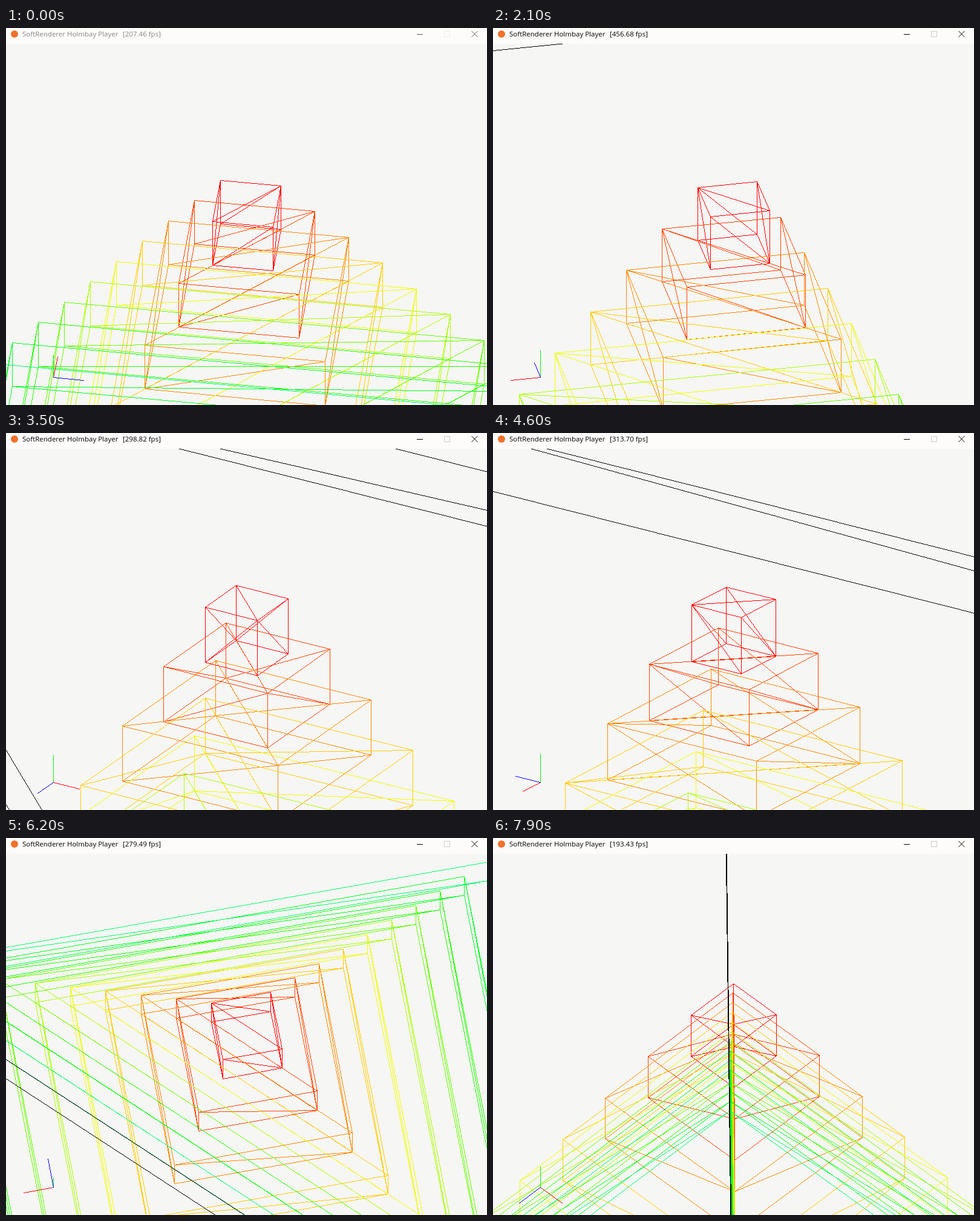
An HTML page with a canvas for the animation above (8 s loop, 795 by 622 pixels).

```html
<!DOCTYPE html>
<html lang="en">
<head>
<meta charset="utf-8">
<title>Wireframe pyramid</title>
<style>
html, body { margin: 0; width: 100%; height: 100%; overflow: hidden; background: #f6f6f5; }
#bar {
  position: absolute; left: 0; top: 0; width: 795px; height: 26px;
  background: #fdfcfa; color: #000;
  font: 11.5px/16px "Open Sans", "Noto Sans", sans-serif; white-space: pre;
}
#bar.idle { color: #868686; }
#bar span { position: absolute; top: 2px; }
#dot { position: absolute; left: 8px; top: 4px; width: 12px; height: 12px; border-radius: 50%; background: #f0722c; }
#name { left: 27px; }
#fps { left: 193px; }
#bar svg { position: absolute; left: 670px; top: 0; fill: none; stroke: currentColor; }
#bar.idle svg { color: #606060; }
#max { stroke: #cccccc; }
.idle #max { stroke: #ececec; }
canvas { position: absolute; left: 0; top: 26px; }
</style>
</head>
<body>
<div id="bar" class="idle">
  <i id="dot"></i><span id="name">SoftRenderer Holmbay Player</span><span id="fps"></span>
  <svg width="125" height="26">
    <path d="M9 10.5h10" shape-rendering="crispEdges"/>
    <path id="max" d="M54.5 5.5h9v9h-9z" shape-rendering="crispEdges"/>
    <path d="M99.5 5l10 10M109.5 5l-10 10"/>
  </svg>
</div>
<canvas id="view" width="795" height="596"></canvas>
<script>
const W = 795, H = 596, LOOP = 8000, STEP = 100;
const CX = 398, CY = 300, UNIT = 100, LEVELS = 10;

// The camera turns steadily from view to view, except while paused
const views = [
  { time: 0, yaw: -82.5, pitch: 43.7, rate: 207.46 },
  { time: 1300, yaw: 39.9, pitch: 22.3, rate: 377.79 },
  { time: 2100, yaw: 168.4, pitch: 29.2, rate: 456.68 },
  { time: 3500, yaw: 390.9, pitch: 24.85, rate: 298.82 },
  { time: 5400, yaw: 578.64, pitch: 17.8, rate: 376.55 },
  { time: 6800, yaw: 488.42, pitch: 116.6, rate: 194.34 },
  { time: 7900, yaw: 404.48, pitch: 47.3, rate: 193.43 }
];
const pauses = [
  [0, 500], [3200, 3300], [3700, 3900], [4300, 4400],
  [5400, 5600], [6400, 6500], [7100, 7200], [7700, 7800]
];

const ctx = document.getElementById('view').getContext('2d');
const bar = document.getElementById('bar');
const fps = document.getElementById('fps');
const image = ctx.createImageData(W, H);
const pixels = new Uint32Array(image.data.buffer);

const rgb = (r, g, b) => (255 << 24 | b << 16 | g << 8 | r) >>> 0;
const PAPER = rgb(246, 246, 245), BLACK = rgb(0, 0, 0);
const RED = rgb(255, 0, 0), GREEN = rgb(0, 255, 0), BLUE = rgb(0, 0, 255);

function hue(deg) {
  const part = n => {
    const k = (n + deg / 60) % 6;
    return Math.round(255 * (1 - Math.max(0, Math.min(k, 4 - k, 1))));
  };
  return rgb(part(5), part(3), part(1));
}

// Time spent moving up to t
function active(t) {
  return pauses.reduce((left, [a, b]) => left - Math.max(0, Math.min(t, b) - a), t);
}

function viewAt(t) {
  const i = Math.max(1, views.findIndex(v => v.time >= t));
  const a = views[i - 1], b = views[i], from = active(a.time);
  const f = (active(t) - from) / (active(b.time) - from);
  const mix = key => a[key] + (b[key] - a[key]) * f;
  const flicker = 24 * Math.sin(Math.PI * f) * Math.sin(active(t) * 1.37);
  return { yaw: mix('yaw'), pitch: mix('pitch'), rate: mix('rate') + flicker };
}

// One pixel wide, without smoothing
function line(p, q, color) {
  const [x0, y0] = p.map(Math.floor), [x1, y1] = q.map(Math.floor);
  const dx = x1 - x0, dy = y1 - y0;
  const n = Math.max(Math.abs(dx), Math.abs(dy), 1);
  for (let i = 0; i <= n; i++) {
    const x = Math.round(x0 + dx * i / n), y = Math.round(y0 + dy * i / n);
    if (x >= 0 && x < W && y >= 0 && y < H) pixels[y * W + x] = color;
  }
}

// Corner bits: 1 = +x, 2 = +y, 4 = +z. Each face has a diagonal that flips two bits.
const edges = [];
for (let a = 0; a < 8; a++) {
  for (const bits of [1, 2, 4, 3, 5, 6]) if (!(a & bits)) edges.push([a, a | bits]);
}

function projector({ yaw, pitch }) {
  const a = yaw * Math.PI / 180, p = pitch * Math.PI / 180;
  const ca = Math.cos(a), sa = Math.sin(a), cp = Math.cos(p), sp = Math.sin(p);
  return (x, y, z, ox, oy, scale) => [
    ox + scale * (x * ca - z * sa),
    oy + scale * ((x * sa + z * ca) * sp - y * cp)
  ];
}

function box(project, size, y, color) {
  const side = bit => bit ? 0.5 : -0.5;
  const pts = Array.from({ length: 8 }, (_, i) => project(
    size * side(i & 1), y + side(i & 2), size * side(i & 4), CX, CY, UNIT
  ));
  for (const [a, b] of edges) line(pts[a], pts[b], color);
}

function draw(t) {
  const view = viewAt(t), project = projector(view);
  bar.className = t < 300 ? 'idle' : '';
  fps.textContent = '[' + view.rate.toFixed(2) + ' fps]';

  pixels.fill(PAPER);
  for (let n = 0; n < LEVELS; n++) box(project, n + 1, -n, hue(n * 16));
  box(project, 50, -LEVELS, BLACK);

  const axis = (x, y, z, color) =>
    line([78, 550], project(x, y, z, 78.5, 550.5, 50), color);
  axis(0, 1, 0, GREEN);
  axis(1, 0, 0, RED);
  axis(0, 0, 1, BLUE);
  ctx.putImageData(image, 0, 0);
}

let shown = -1;
function tick() {
  const t = Math.floor(performance.now() % LOOP / STEP) * STEP;
  if (t !== shown) draw(shown = t);
  requestAnimationFrame(tick);
}
tick();
</script>
</body>
</html>
```
